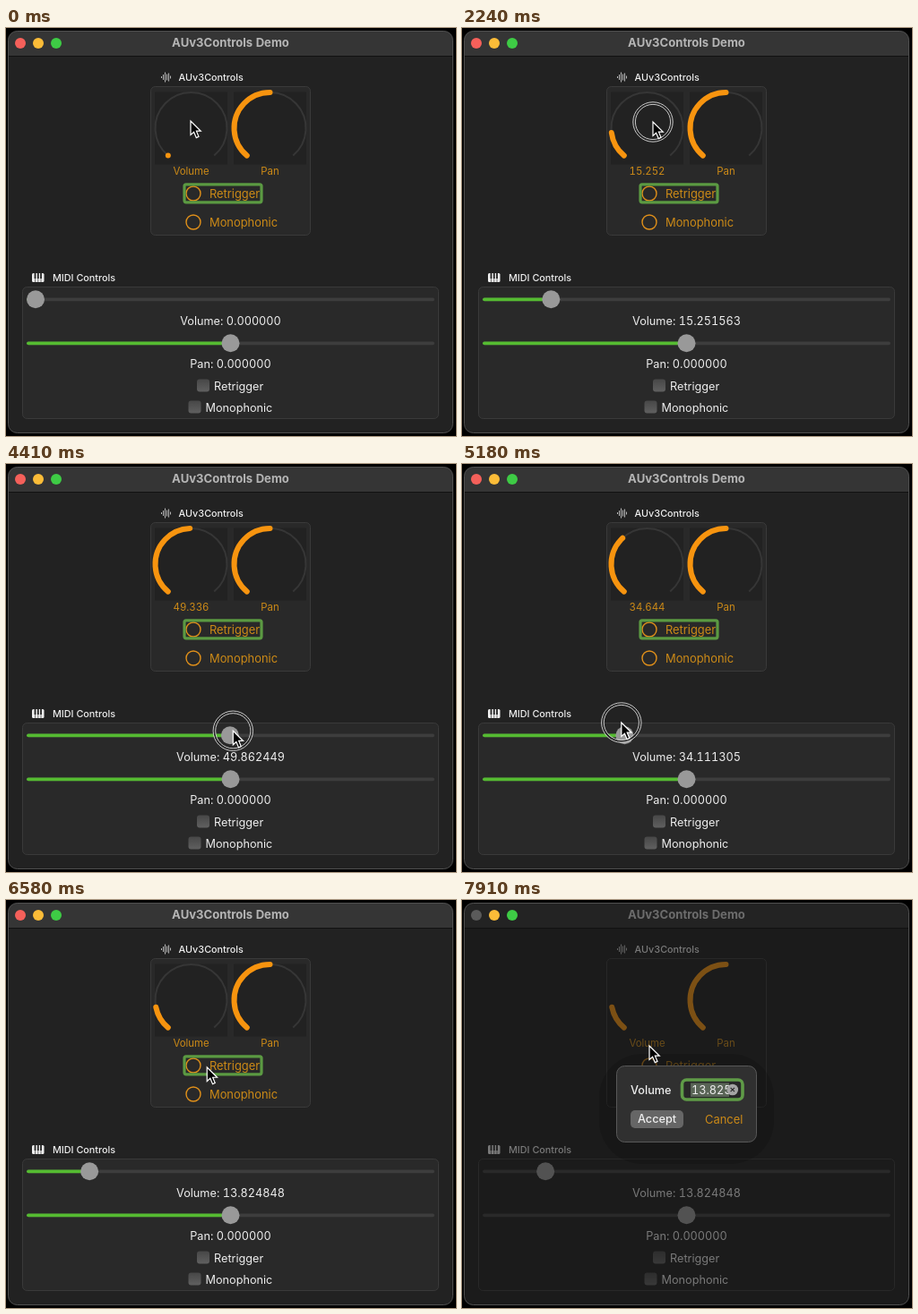
These frames come from a looping animation (502 by 456 pixels, 8 s). An HTML page:

```html
<!DOCTYPE html>
<html lang="en">
<head>
<meta charset="utf-8">
<title>AUv3Controls Demo</title>
<style>
html, body { margin: 0; width: 100%; height: 100%; overflow: hidden; background: #000; }
svg { display: block; width: 502px; height: 456px; font: 12.7px Inter, "Open Sans", sans-serif; font-variant-numeric: tabular-nums; fill: #eee; }
.mid { text-anchor: middle; }
.head { font-size: 10.8px; font-weight: 500; }
.gold { fill: #cc8a17; }
.wide { font-size: 12.9px; }
.small { font-size: 11.4px; }
.panel { fill: #292929; stroke: #3a3a3a; }
.rail, .fill { stroke: #3d3d3d; stroke-width: 3.8; stroke-linecap: round; }
.fill { stroke: #55bb31; }
.thumb { fill: #999; }
.box { fill: url(#check); }
.line { fill: none; }
.arc { fill: none; stroke: #f7940f; stroke-width: 6; stroke-linecap: round; }
</style>
</head>
<body>
<svg viewBox="0 0 502 456">
  <defs>
    <linearGradient id="check" x2="0" y2="1"><stop stop-color="#474747"/><stop offset="1" stop-color="#606060"/></linearGradient>
    <path id="sweep" d="M-25.7 30.6A40 40 0 1 1 25.7 30.6" pathLength="100"/>
    <g id="dial">
      <rect x="-40.5" y="-40.5" width="81" height="81" fill="#222"/>
      <use href="#sweep" fill="none" stroke="#363636" stroke-width="2"/>
    </g>
  </defs>

  <rect x="2.5" y="3.5" width="496" height="449" rx="10" fill="#222"/>
  <rect id="shade" x="2.5" y="3.5" width="496" height="449" rx="10" fill="#1b1b1b"/>
  <path id="bar" d="M2.5 31V13.5a10 10 0 0 1 10-10H488.5a10 10 0 0 1 10 10V31Z" fill="#353535"/>
  <path d="M3 31.5H498" stroke="#111"/>
  <rect class="line" x="2.5" y="3.5" width="496" height="449" rx="10" stroke="#505050"/>
  <circle id="close" cx="16" cy="17" r="6"/>
  <circle cx="36" cy="17" r="6" fill="#fbbc38"/>
  <circle cx="56" cy="17" r="6" fill="#3ecb45"/>
  <text id="title" class="mid" x="250.5" y="21" font-size="13.1" font-weight="700" fill="#b5b5b5">AUv3Controls Demo</text>

  <g id="content">
    <path d="M173.5 54v2M175.5 52v6M177.5 49.5v11M179.5 51.5v7M181.5 50.5v9M183.5 53.5v3" stroke="#bbb"/>
    <text class="head" x="192.5" y="58.5">AUv3Controls</text>
    <rect class="panel" x="161.5" y="65.5" width="178" height="166" rx="5"/>
    <g id="dials">
      <use href="#dial" x="206.5" y="112"/>
      <use href="#dial" x="294.5" y="112"/>
    </g>
    <use id="arc" class="arc" href="#sweep" x="206.5" y="112"/>
    <use class="arc" href="#sweep" x="294.5" y="112" stroke-dasharray="50 200"/>
    <text id="label" class="mid gold small" x="206.5" y="164"></text>
    <text class="mid gold small" x="294.5" y="164">Pan</text>
    <g class="line" stroke="#e0901a" stroke-width="1.4">
      <circle cx="209" cy="185" r="8"/><circle cx="209" cy="217" r="8"/>
    </g>
    <text class="gold wide" x="227" y="189.5">Retrigger</text>
    <text class="gold wide" x="227" y="221.5">Monophonic</text>
    <rect id="focus" class="line" x="199" y="174.8" width="86" height="20" rx="2" stroke="#5b9a42" stroke-width="3.2"/>

    <rect x="29" y="274" width="13.5" height="10" rx="1.5"/>
    <path d="M32.5 274v6M35.8 274v6M39 274v6" stroke="#222" stroke-width="1.8"/>
    <path d="M32.5 279v5M35.8 279v5M39 279v5" stroke="#222" stroke-width=".6"/>
    <text class="head" x="52" y="282.5">MIDI Controls</text>
    <rect class="panel" x="18.5" y="289.5" width="464" height="147" rx="5"/>
    <path class="rail" d="M25 303.3H476M25 352.3H476"/>
    <g id="greens">
      <path id="level" class="fill"/>
      <path class="fill" d="M25 352.3H250"/>
    </g>
    <circle id="thumb" class="thumb" cy="303.3" r="10"/>
    <circle class="thumb" cx="250.5" cy="352.3" r="10"/>
    <text id="volume" class="mid" x="250.5" y="331.5"></text>
    <text class="mid" x="250.5" y="380">Pan: 0.000000</text>
    <rect class="box" x="213" y="392.5" width="14" height="14" rx="3"/>
    <text x="232" y="404.5">Retrigger</text>
    <rect class="box" x="203.5" y="416.5" width="14" height="14" rx="3"/>
    <text x="222.5" y="428.5">Monophonic</text>
  </g>

  <g id="dialog">
    <rect x="153" y="172" width="195" height="123" rx="48" fill="#000" opacity=".14"/>
    <rect x="172.5" y="185.5" width="156" height="85" rx="9" fill="#303030" stroke="#585858"/>
    <text x="188" y="217" font-weight="500">Volume</text>
    <rect x="245.5" y="201" width="67.5" height="22" rx="5" fill="#282828" stroke="#5f9b47" stroke-width="3.6"/>
    <rect x="255" y="204.5" width="43" height="15.5" fill="#596456"/>
    <text x="256" y="217">13.825</text>
    <circle cx="301.8" cy="212" r="6.3" fill="#a5a5a5"/>
    <path d="M299.6 209.8l4.4 4.4m0-4.4l-4.4 4.4" stroke="#2a2a2a" stroke-width="1.2"/>
    <rect x="188" y="235" width="59" height="20" rx="5" fill="#666"/>
    <text class="mid" x="217.5" y="249.3" font-weight="500">Accept</text>
    <text class="gold wide" x="271" y="249.8">Cancel</text>
  </g>

  <g id="cursor">
    <g id="ring" class="line" stroke="#ddd" stroke-width=".9">
      <circle r="20.8" stroke="#222" stroke-width="2"/>
      <circle r="22.2"/><circle r="19.6"/>
    </g>
    <path d="M0 0V15.5L3.6 12.2 6.3 18.6 9 17.4 6.4 11.2H11.3Z" fill="#000" stroke="#fff" stroke-width="1.2"/>
  </g>
</svg>

<script>
const $ = id => document.getElementById(id);
const LOOP = 8000, STEP = 70;
const DIAL = [350, 2730], SLIDER = [3710, 5740], CLICK = [7420, 7560];
const READOUT_HOLD = 350, DIAL_LAG = 9.72, POINTER_LEAD = 15;

// turning points of the volume: [time, value]
const volumes = [[350, 0], [1365, 22.09581], [1960, 11.79082], [2600, 20.299345],
  [3850, 20.299345], [4600, 55.494212], [5740, 13.824848]];
// free pointer travel between drags: [time, x, y]
const travel = [[0, 206, 104], [210, 208, 140], [2730, 213, 97], [3570, 122, 304],
  [5740, 93, 289], [6440, 228, 193], [6930, 209, 163]];

const clamp = x => Math.max(0, Math.min(1, x));
const during = ([a, b], t) => t >= a && t < b;

function ease(t, a, b) {
  const u = clamp((t - a) / (b - a));
  return u * u * (3 - 2 * u);
}

function glide(keys, t, i = 1) {
  return keys.reduce((v, key, n) => n ? v + (key[i] - v) * ease(t, keys[n - 1][0], key[0]) : v, keys[0][i]);
}

const volumeAt = t => glide(volumes, t);
const sliderX = v => 33 + 4.35 * v;

function pointer(t) {
  if (during(DIAL, t)) {
    const v = volumeAt(t);
    return [208 + 5 * ease(t, 350, 1365), 140 - 2.84 * v + .0357 * v * v];
  }
  if (during([3570, SLIDER[1]], t))
    return [sliderX(volumeAt(t + POINTER_LEAD)), 304 - 15 * ease(t, 3850, 5180)];
  return [glide(travel, t), glide(travel, t, 2)];
}

function draw(t) {
  const v = volumeAt(t), x = sliderX(v);
  const dial = t < SLIDER[0] ? v : volumeAt(t - DIAL_LAG);
  const reading = [DIAL, SLIDER].some(([a, b]) => during([a + STEP, b + READOUT_HOLD], t));
  // the slider drag only moves the dial once the value changes
  const still = during([SLIDER[0], volumes[4][0]], t);
  $('arc').setAttribute('stroke-dasharray', `${dial} 200`);
  $('label').textContent = reading && !still ? dial.toFixed(3) : 'Volume';
  $('level').setAttribute('d', `M25 303.3H${x}`);
  $('thumb').setAttribute('cx', x);
  $('volume').textContent = `Volume: ${v.toFixed(6)}`;

  $('cursor').setAttribute('transform', `translate(${pointer(t)})`);
  $('ring').style.opacity = Math.max(...[DIAL, SLIDER, CLICK].map(([a, b]) =>
    clamp(Math.min(t - a, b - t) / STEP + .5)));

  // the dialog opens and the window behind it dims
  const p = 1 - (1 - clamp((t - 7525) / 300)) ** 2;
  $('dialog').setAttribute('transform', `translate(250.5 228) scale(${.85 + .15 * p}) translate(-250.5 -228)`);
  $('dialog').style.opacity = $('shade').style.opacity = p;
  $('content').style.opacity = 1 - .55 * p;
  $('title').style.opacity = 1 - .5 * p;
  $('bar').style.opacity = 1 - .7 * p;
  for (const id of ['greens', 'focus', 'dials']) $(id).style.opacity = 1 - p;
  for (const el of document.querySelectorAll('.panel')) el.style.fillOpacity = 1 - p;
  $('close').setAttribute('fill', p > 0 ? '#5a5a5a' : '#f5605a');
}

function tick(now) {
  const t = now % LOOP;
  draw(Math.min(7910, Math.floor(t / STEP) * STEP));
  requestAnimationFrame(tick);
}
draw(0);
requestAnimationFrame(tick);
</script>
</body>
</html>
```
